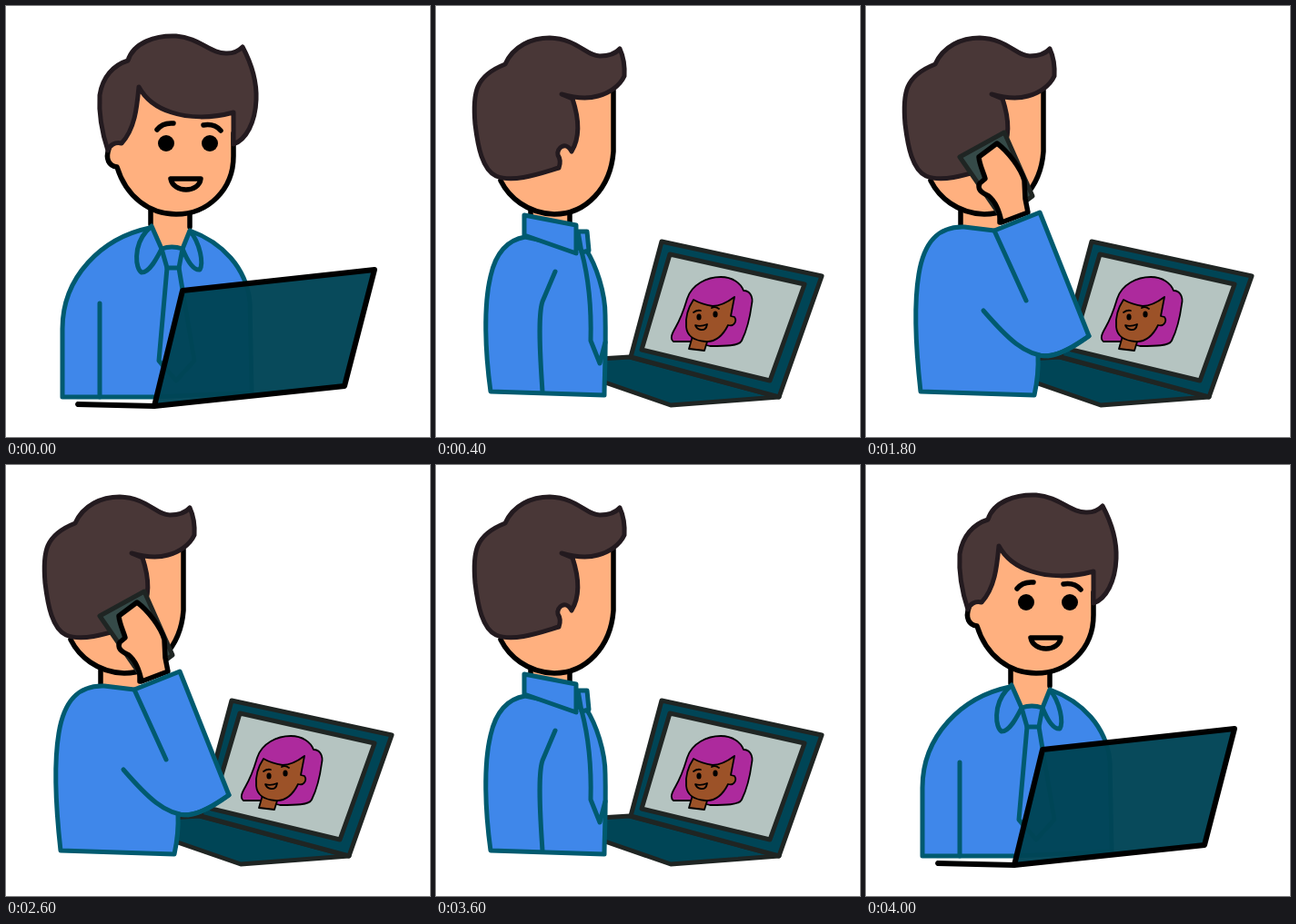
An HTML page that plays this animation: 466 px wide and 474 px high, repeating every 4200 ms.

```html
<!DOCTYPE html>
<html lang="en">
<head>
<meta charset="utf-8">
<title>Laptop call</title>
<style>
  html, body { margin: 0; width: 100%; height: 100%; overflow: hidden; background: #fff; }
  svg { display: block; width: 100%; height: 100%; }
  path, ellipse { stroke-linejoin: round; stroke-linecap: round; fill: none; }
  .skin { fill: #ffb07f; }
  .ink { stroke: #000; stroke-width: 5.5; }
  .hair { fill: #493737; stroke: #231a1f; stroke-width: 5; }
  .cloth { fill: #3f87ea; stroke: #005a6f; stroke-width: 5; }
  .seam { stroke: #005a6f; stroke-width: 5; }
  .case { fill: #004556; stroke: #1f2523; stroke-width: 5; }
  .screen { fill: #b5c4c1; stroke: #1f2523; stroke-width: 5; }
  .lid { fill: #004556; fill-opacity: .97; stroke: #000; stroke-width: 6; }
  .phone { fill: #354a48; stroke: #1f2523; stroke-width: 5; }
  .dot { fill: #000; }
  .purple { fill: #ad2a9d; stroke: #000; stroke-width: 1.8; }
  .brown { fill: #9c5228; stroke: #000; stroke-width: 1.8; }
  .fine { stroke: #000; stroke-width: 1.8; }
</style>
</head>
<body>
<svg viewBox="0 0 466 474">
  <defs>
    <filter id="soft" x="-50%" y="-30%" width="200%" height="160%"><feGaussianBlur stdDeviation="4"/></filter>
    <clipPath id="face"><path d="M138 97L196 92L195 160C192 200 165 228 130 228Z"/></clipPath>
    <g id="woman">
      <path class="purple" d="M261 369C257 366 259 361 263 354C271 340 273 332 276 322C281 306 298 298 313 298C326 298 335 305 338 313C345 313 349 320 347 328C345 343 342 356 336 368C333 374 318 374 301 374L282 369Z"/>
      <path class="brown" d="M282 363L299 366L295 379L278 377Z"/>
      <path class="brown" d="M283 323C277 332 274 343 275 353C276 363 284 368 296 369C308 370 316 361 321 351C328 353 331 346 328 342L324 341L328 320C320 326 312 330 304 330C297 329 290 327 283 323Z"/>
      <ellipse class="dot" cx="289" cy="342" rx="2.600" ry="3.500"/>
      <ellipse class="dot" cx="307" cy="339" rx="2.600" ry="3.500"/>
      <path class="fine" d="M283 337Q287 334 291 335M303 332Q307 330 311 333M285 351Q291 353 298 350Q297 357 291 356Q286 355 285 351Z"/>
    </g>
  </defs>

  <g id="front">
    <path class="cloth" d="M62 430L62 355C62 298 105 255 158 244L202 247C238 260 264 288 268 325L270 425L165 430Z"/>
    <path class="seam" d="M103 327V430M177 288L168 390L187 412L207 390L190 288"/>
    <path class="skin" d="M159 218H202V247L194 267Q182 263 171 267L159 242Z"/>
    <path class="ink" d="M159 224V240M202 224V243"/>
    <path class="cloth" d="M160 242L171 267C166 277 158 293 149 293C142 289 140 264 154 248ZM202 247L194 267C198 277 205 291 213 290C217 283 214 262 202 247Z"/>
    <path class="cloth" d="M171 267Q182 263 194 267L190 288H177Z"/>
    <path class="skin" d="M146 85L250 110V165C250 202 222 229 187 229C158 229 132 210 122 177C113 176 109 168 113 157L127 148Z"/>
    <path class="ink" d="M250 140V165C250 202 222 229 187 229C158 229 132 210 122 177C113 176 109 168 113 157"/>
    <path class="hair" d="M112 159C105 138 102 115 103 98C106 78 118 65 134 60C140 40 165 32 187 33C213 35 225 53 243 52C251 52 256 49 260 45C268 60 276 80 275 103C274 128 264 147 250 152V117C225 124 200 123 182 117C166 112 153 102 146 89C144 110 142 135 127 151C120 149 114 153 112 159Z"/>
    <ellipse class="dot" cx="176" cy="151" rx="9" ry="9"/>
    <ellipse class="dot" cx="224" cy="151" rx="9" ry="9"/>
    <path class="ink" d="M166 136Q172 128 184 129M217 131Q229 129 236 137M181 190H214C212 206 184 206 181 190Z"/>
    <path class="dot" d="M78 435L163 437V443L78 441Q74 438 78 435Z"/>
    <path class="lid" d="M194 313L405 290L372 418L163 440Z"/>
  </g>

  <g id="side">
    <path class="case" d="M178 428L284 405L350 419L219 440Z"/>
    <path class="case" d="M335 267L410 273L351 419L281 405Z"/>
    <path class="screen" d="M342 285L391 288L347 409L297 401Z"/>
    <use href="#woman" transform="matrix(.52 -.12 -.19 .88 251.100 81.400)"/>
    <path class="skin" d="M117 215H160V245H117Z"/>
    <path class="ink" d="M117 220V236M160 222V236"/>
    <path class="cloth" d="M59 425C56 370 55 330 60 300C66 270 86 255 108 248L180 255C197 266 203 290 206 320C210 360 209 400 208 425Z"/>
    <path class="seam" d="M124 425C122 380 121 330 126 312Q129 303 135 296"/>
    <path class="cloth" d="M113 235L160 240L151 271L107 250ZM162 234L178 241L182 265H173L160 240Z"/>
    <path class="cloth" d="M163 264L167 280L171 372L180 391L190 370L182 315L174 264Z"/>
    <path class="cloth" d="M154 246H174L179 262L161 265Z"/>
    <path class="skin" d="M150 95L211 108L209 160C207 200 178 227 145 227C120 226 104 213 95 201L120 150Z"/>
    <path class="ink" d="M210 110L209 160C207 200 178 227 145 227C120 226 104 213 95 201"/>
    <path class="hair" d="M83 202C70 196 66 165 62 130C58 100 61 80 82 63C92 45 120 33 150 33C180 33 190 48 203 49Q212 49 217 42L219 75C220 95 213 110 203 115C185 113 165 108 151 98C152 125 150 145 138 156C131 150 124 155 123 163C129 169 131 176 126 183C118 195 98 207 83 202Z"/>
    <ellipse class="dot" cx="183" cy="148" rx="8" ry="9.500"/>
    <path class="ink" d="M172 133Q178 125 189 127"/>
    <path class="ink" style="stroke-width:4.500" d="M203 183L188 185Q190 196 198 197Z"/>
  </g>

  <g id="back">
    <path class="case" d="M180 388L213 386L377 430L258 439L180 412Z"/>
    <path class="case" d="M248 259L424 297L377 430L214 386Z"/>
    <path class="screen" d="M257 273L405 306L367 412L226 378Z"/>
    <use href="#woman"/>
    <path id="thumb" class="brown" d="M307 376C306 384 308 391 313 394C319 396 325 394 327 389C330 382 330 376 329 371C331 366 328 362 324 363C322 368 318 372 312 374Z"/>
    <path class="skin" d="M104 215H147V250H104Z"/>
    <path class="ink" d="M104 222V242M147 222V238"/>
    <path class="skin" d="M138 95L196 92L195 160C192 200 165 228 130 228C100 228 80 210 71 190Z"/>
    <g clip-path="url(#face)">
      <rect id="blush" x="156" y="139" width="31" height="64" rx="6" fill="#ff552c" filter="url(#soft)"/>
    </g>
    <path class="ink" d="M195 93V160C192 200 165 229 130 229C100 228 80 210 71 192"/>
    <path class="hair" d="M135 178C115 184 85 195 66 187C51 180 46 155 43 130C40 95 43 77 76 64C85 44 105 35 125 35C155 36 165 55 180 55Q195 55 202 47Q208 60 207 77C202 88 190 96 178 99C165 103 152 101 138 97L150 102C156 120 160 142 149 160C143 148 132 156 134 164Q138 170 135 178Z"/>
    <g id="rest">
      <path class="cloth" d="M60 424C54 380 52 330 60 297C66 270 80 257 98 254L165 268C176 285 186 315 186 340C187 380 185 410 185 428Z"/>
      <path class="seam" d="M117 424C114 380 112 340 117 325L131 292M160 270C168 300 171 330 170 368L180 393L186 370"/>
      <path class="cloth" d="M97 230L154 241V272L97 252ZM156 248H166L168 269L160 271Z"/>
    </g>
    <g id="call">
      <path class="phone" d="M103 166L152 139L183 209L150 234Z"/>
      <path class="skin ink" d="M149 238C146 222 141 214 135 209C126 205 122 201 125 195L131 190C129 182 125 176 124 166L144 151C156 160 170 178 174 192L175 212L178 227Z"/>
      <path class="cloth" d="M60 424C54 370 53 325 58 295C64 257 81 242 108 243L141 247L191 227L245 363C222 380 205 387 189 384Q190 405 185 428Z"/>
      <path class="seam" d="M141 247L176 324M129 335C155 365 175 385 200 385C215 383 230 373 245 363"/>
    </g>
  </g>
</svg>
<script>
  const STEP = 200, STEPS = 21;
  const show = (id, on) => document.getElementById(id).style.display = on ? "" : "none";

  function draw(now) {
    const step = Math.floor(now / STEP) % STEPS;
    const front = step === 0 || step === 20;
    const side = step === 1 || step === 19;
    const calling = step >= 3 && step <= 17;
    const thumb = step === 16 || step === 17;
    show("front", front);
    show("side", side);
    show("back", !front && !side);
    show("rest", !calling);
    show("call", calling);
    show("blush", calling && (thumb || step % 2 === 0));
    show("thumb", thumb);
  }

  const start = performance.now();
  function loop() {
    draw(performance.now() - start);
    requestAnimationFrame(loop);
  }
  loop();
</script>
</body>
</html>
```
